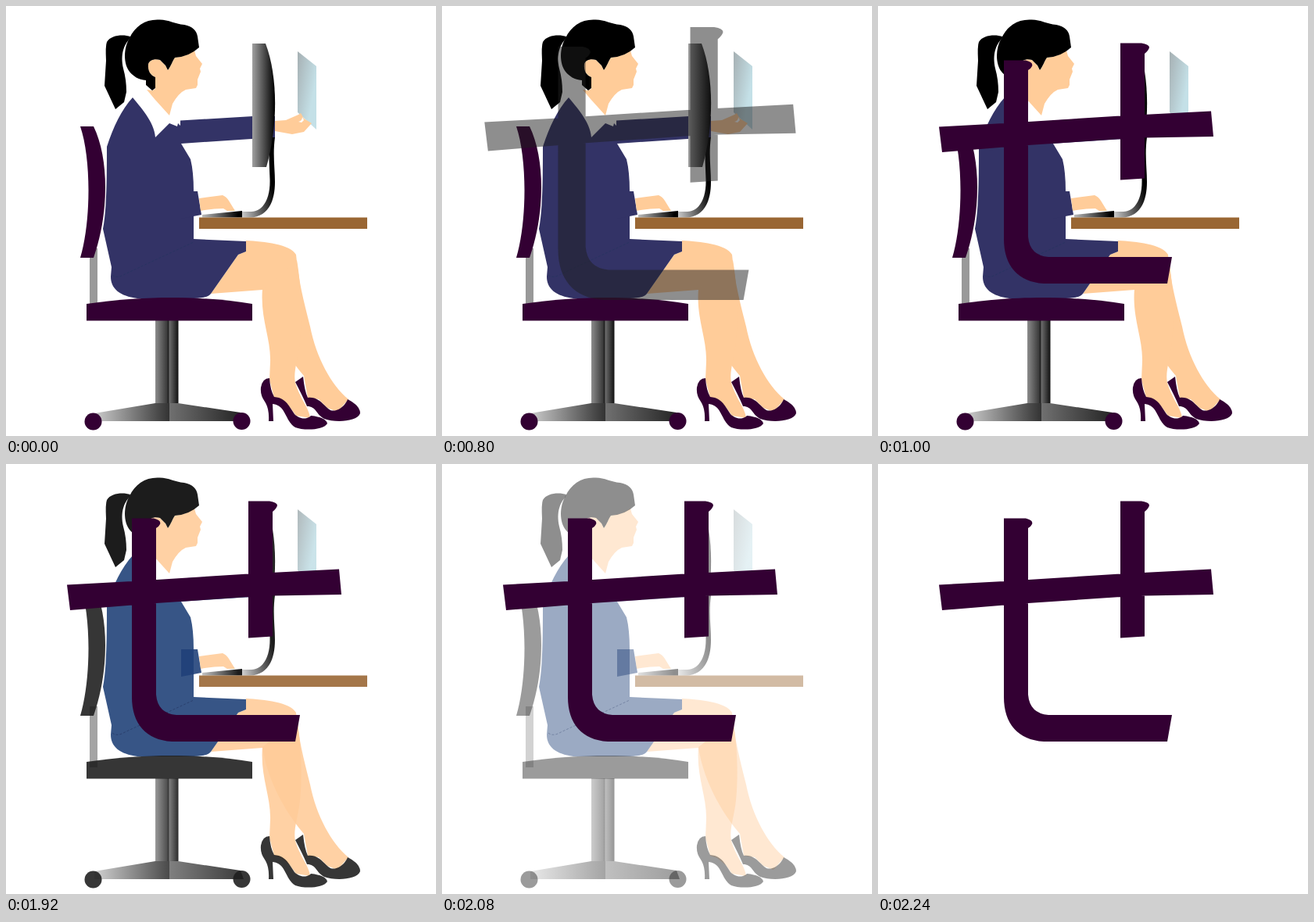
An HTML page that plays this animation: 550x550 px, repeating every 3 s.

```html
<!DOCTYPE html>
<html lang="ja">
<head>
<meta charset="utf-8">
<title>せ</title>
<style>
  html, body { margin: 0; width: 100%; height: 100%; overflow: hidden; background: #fff; }
  svg { display: block; width: 100vw; height: 100vh; }
  .plum { fill: #303; }
  .navy { fill: #336; }
  .skin { fill: #fc9; }
  /* Colours turn more neutral while a part is translucent. */
  .fading .plum, .plum.fading { fill: #1e1e1e; }
  .fading .navy { fill: #1f4078; }
  #scene > * { opacity: var(--fade, 1); }
</style>
</head>
<body>
<svg viewBox="0 0 550 550">
  <defs>
    <linearGradient id="screen"><stop stop-color="#a0a0a0"/><stop offset="1" stop-color="#000"/></linearGradient>
    <linearGradient id="paper" x2=".8" y2=".6"><stop stop-color="#a6b0b3"/><stop offset="1" stop-color="#c4e0e7"/></linearGradient>
    <linearGradient id="keys"><stop stop-color="#bbb"/><stop offset=".9" stop-color="#000"/></linearGradient>
    <linearGradient id="neck" x1="0" y1="1" x2=".9" y2=".55"><stop stop-color="#ccc"/><stop offset="1" stop-color="#000"/></linearGradient>
    <linearGradient id="pole"><stop stop-color="#8c8c8c"/><stop offset=".5" stop-color="#3c3c3c"/><stop offset=".56" stop-color="#222"/><stop offset=".62" stop-color="#6a6a6a"/><stop offset="1" stop-color="#111"/></linearGradient>
    <linearGradient id="footL"><stop stop-color="#ccc"/><stop offset="1" stop-color="#333"/></linearGradient>
    <linearGradient id="footR"><stop stop-color="#707070"/><stop offset="1" stop-color="#222"/></linearGradient>
  </defs>

  <g id="scene">
    <!-- chair -->
    <rect x="107" y="310" width="10" height="78" fill="#999"/>
    <path class="plum" d="M95 154H112C132 195 132 265 112 322H95C109 275 109 195 95 154Z"/>
    <rect x="191" y="402" width="29.500" height="106" fill="url(#pole)"/>
    <path fill="url(#footL)" d="M113 521L191 508H209V531H113Z"/>
    <path fill="url(#footR)" d="M209 508H220L300 520L304 531H209Z"/>
    <circle class="plum" cx="111.500" cy="531.500" r="11"/>
    <circle class="plum" cx="301.500" cy="531" r="11"/>

    <!-- legs and shoes -->
    <path class="skin" d="M307 300C330 301 364 305 371 318C374 350 380 375 389 410C397 450 416 485 438 503L424 519L411 514L400 503L386 501L381 473C363 452 336 412 328 363L262 368L297 318L307 314Z"/>
    <path class="skin" d="M328 362C325 400 339 425 338 455L337 478L343 501L352 504L363 513L371 524L389 527C388 515 376 502 370 482C367 468 374 450 376 430C379 400 378 360 372 325L350 345Z"/>
    <path class="plum" d="M370 481L380 474Q382 493 386 501C401 499 407 513 415 517C424 520 434 511 437 503Q453 511 453 521C449 532 421 533 407 528C396 522 397 512 385 512Q380 500 370 481Z"/>
    <path class="plum" d="M326 488Q328 476 337 476Q338 491 343 500C358 501 362 512 369 522C378 531 388 527 390 524Q409 526 411 534C406 543 380 543 370 539C356 530 359 511 341 509L342 531H336Q337 515 331 506Q325 498 326 488Z"/>

    <!-- body -->
    <path class="navy" d="M162 117C170 127 190 148 191 168L209 150L219 154L220 150L223 153V146.500L316 141H344V168L224 176L236 196Q240 212 240 237V298L307 301V314L297 318L262 368Q257 374 240 374H168C146 371 134 362 134 346L135 334L124 285C129 260 129 215 129 180C137 155 148 132 162 117Z"/>
    <path fill="none" stroke="#24345f" stroke-width=".7" stroke-dasharray="3 2" d="M136 344Q142 349 152 343L240 302"/>
    <path class="plum" d="M103 381C145 375 180 373 210 373S280 375 315 381V402.500H103Z"/>
    <path class="navy" d="M224 237H245L250 267L224 272Z"/>

    <!-- head -->
    <path class="skin" d="M191 106V91C185 89 181 83 182 74C184 69 190 67 197 69L204 76L207 82C211 77 213 70 216 66Q230 65 241 57L243 64L251 74L248 80L249 84L247 89L245 94V101L243 105L230 107Q221 111 213 125L209 140L190 119L180 107L187 108Z"/>
    <path d="M158 41C165 26 178 17 195 17.500C208 17 215 23 228 24C239 26 244 32 245 39L247 53Q234 65 216 66C213 70 211 77 207 82L204 76L197 69C190 67 184 69 182 74C181 83 185 89 191 91V105L187 108L179 101V95C169 94 163 90 158 84C150 74 150 54 158 41Z"/>
    <path d="M159 39C150 36 134 37 129 46Q127 51 128 70L126 102L140 132L151 123L154 110Q154 94 150 80C146 61 151 50 158 42Z"/>

    <!-- desk -->
    <path class="skin" d="M247 246L277 242Q282 244 285 249L293 262H283L278 259Q265 259 249 262Z"/>
    <path fill="url(#keys)" d="M251 267L302 262V270.500H251Z"/>
    <path fill="url(#neck)" d="M302 263H314C329 262 338 247 337.500 222C337 200 335 190 339 168H344C341 190 344 208 344 225C344 252 334 270 312 270.500H302Z"/>
    <rect x="247" y="270.500" width="215" height="14.500" fill="#963"/>
    <path fill="url(#paper)" d="M373 58L397 77V158L373 136Z"/>
    <path class="skin" d="M344 147L358 146L374 139L377 137L381 144L391 150L381 161L366 164L344 160Z"/>
    <path fill="#fff" d="M374 148Q379 147 379 142L381 146L378 149Z"/>
    <path fill="url(#screen)" d="M315 48H332C348 90 348 155 333 206H315Z"/>
  </g>

  <path id="kana" class="plum" d="M161 69.500H189Q199 72 197 77Q195 81 192 82V295Q194 319 218 321H376L370 355H212C179 353 161 332 161 298Z
    M78 154.500L161 150L310 140.500L426 134.500L429 167L341 168.500L310 170L192 178L82 187Z
    M310 47.500H337Q347 49 347 53Q346 57 341 61V220.500L310 222.500Z"/>
</svg>
<script>
  const LOOP = 3000, TICK = 40;
  const scene = document.getElementById('scene');
  const kana = document.getElementById('kana');

  // Progress from 0 to 1 in whole ticks, the first one landing at `start`.
  const steps = (t, start, count) =>
    Math.max(0, Math.min(count, Math.floor((t - start) / TICK) + 1)) / count;

  function draw(t) {
    const enter = steps(t, 640, 10);
    const leave = steps(t, 1920, 9);
    const scale = 1 + 0.269 * (1 - enter);
    kana.setAttribute('opacity', enter);
    kana.setAttribute('transform', `translate(254 199) scale(${scale}) translate(-254 -199)`);
    kana.classList.toggle('fading', enter < 1);
    scene.style.setProperty('--fade', 1 - leave);
    scene.classList.toggle('fading', leave > 0);
  }

  function loop() {
    draw(performance.now() % LOOP);
    requestAnimationFrame(loop);
  }
  loop();
</script>
</body>
</html>
```
